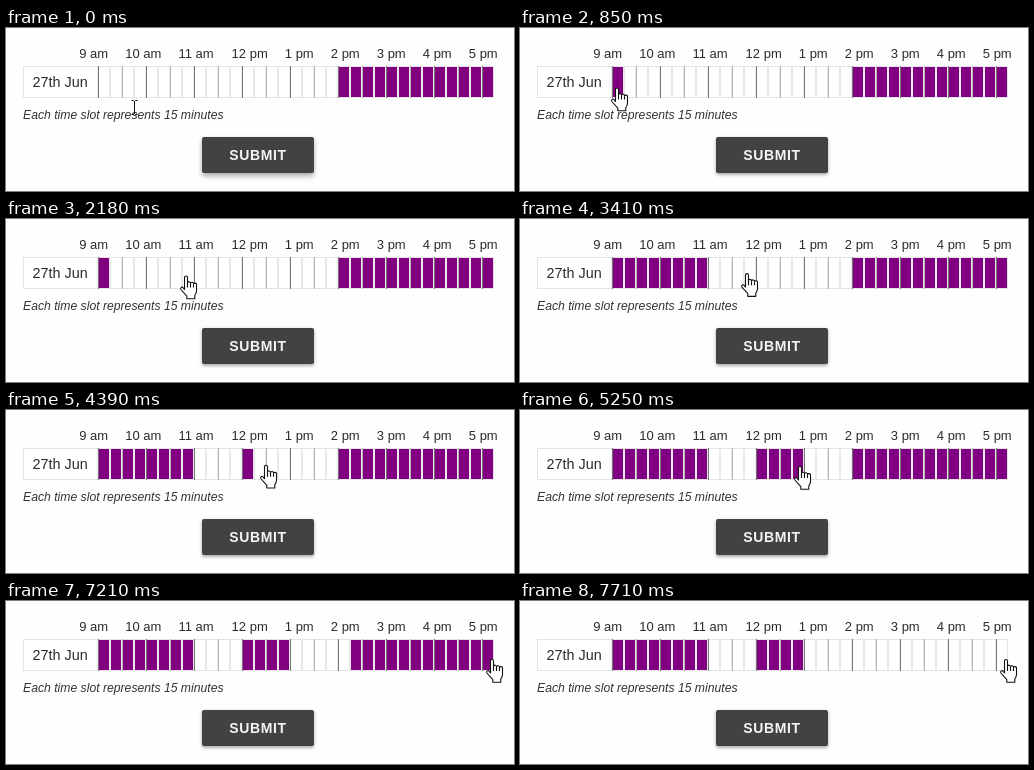
An HTML page for the animation above (8000 ms loop, 508x163 px).

```html
<!DOCTYPE html>
<html lang="en">
<head>
<meta charset="utf-8">
<title>Time slot picker</title>
<style>
  html, body { margin: 0; width: 100%; height: 100%; overflow: hidden; background: #fefefe; }
  svg { position: absolute; left: 0; top: 0; }
  text { font-family: "Liberation Sans", Arial, sans-serif; fill: #2b2b2b; }
  .hour { font-size: 13px; }
  .day { font-size: 14.4px; }
  .note { font-size: 12.2px; font-style: italic; fill: #333; }
  #submit {
    position: absolute; left: 196px; top: 109px; width: 112px; height: 36px;
    border-radius: 2px; background: #424242; color: #f4f4f4;
    font: bold 14px/36px "Liberation Sans", Arial, sans-serif; letter-spacing: .6px; text-align: center;
  }
</style>
</head>
<body>
<svg id="table" width="508" height="163">
  <rect x="17.5" y="38.5" width="470" height="31" fill="#fff" stroke="#e4e4e4"/>
  <text class="day" x="26.5" y="59">27th Jun</text>
  <text class="note" x="17" y="91">Each time slot represents 15 minutes</text>
</svg>
<div id="submit">SUBMIT</div>
<svg width="508" height="163">
  <path id="beam" d="M125.5 72.5h2l1 1l1-1h2M128.5 73v13M125.5 86.5h2l1-1l1 1h2" fill="none" stroke="#111"/>
  <g id="hand" stroke="#111" stroke-width="1.1" stroke-linejoin="round">
    <path fill="#fff" d="M4.5 14V2a1.5 1.5 0 0 1 3 0V7.5a1.5 1.5 0 0 1 3 .4a1.5 1.5 0 0 1 3 .8a1.5 1.5 0 0 1 3 .9V15.5Q16.5 17.5 14.8 20V23.2H6.8V20.6L.9 14C-.2 12 2.2 10.9 3.2 12.3Z"/>
    <path fill="none" d="M7.5 7.5V12M10.5 8V12M13.5 9V12"/>
  </g>
</svg>
<script>
const LOOP = 8000, STEP = 120, SLOTS = 33, SLOT = 12, LEFT = 93, AFTERNOON = 20;
const table = document.getElementById('table');
const hand = document.getElementById('hand');
const beam = document.getElementById('beam');
const submit = document.getElementById('submit');

function add(tag, attrs, text = '') {
  const el = document.createElementNS('http://www.w3.org/2000/svg', tag);
  for (const key in attrs) el.setAttribute(key, attrs[key]);
  el.textContent = text;
  return table.appendChild(el);
}
const bar = (x, width, fill, y = 39, height = 30) => add('rect', { x, y, width, height, fill });

// Hour labels flow inline: two-digit hours take one more digit width.
let labelX = 73.2;
for (let h = 9; h <= 17; h++) {
  const hour = h > 12 ? h - 12 : h;
  add('text', { class: 'hour', x: labelX, y: 30 }, `${hour} ${h < 12 ? 'am' : 'pm'}`);
  labelX += hour > 9 ? 53.2 : 46;
}

// Dark lines mark hours, grey lines half hours.
const cells = [];
for (let i = 0; i < SLOTS; i++) {
  const x = LEFT + i * SLOT;
  bar(x - 2, 2, '#e9e9e9');
  if (i % 2 === 0) bar(x - 1, 1, i % 4 ? '#b4b4b4' : '#777', 38, 32);
  cells.push(bar(x, 10, '#800080'));
}

// Each click or drag toggles a range of slots.
const toggles = [
  { at: 850, from: 0, to: 0 },
  { at: 2810, from: 1, to: 7 },
  { at: 4140, from: 12, to: 12 },
  { at: 5250, from: 13, to: 15 },
  { at: 6230, from: 20, to: 20 },
  { at: 7710, from: 21, to: 32 }
];

// The hand glides to each point in even steps, slowing down.
const glides = [
  { at: 120, steps: 4, x: 91, y: 59.5 },
  { at: 1220, steps: 7, x: 192, y: 56.5 },
  { at: 2060, steps: 2, x: 173.5, y: 56.5 },
  { at: 3170, steps: 5, x: 234, y: 53.5 },
  { at: 4390, steps: 3, x: 273.5, y: 56 },
  { at: 5500, steps: 4, x: 330, y: 56 },
  { at: 6600, steps: 5, x: 486, y: 58, power: 2.4 },
  { at: 7210, steps: 1, x: 480, y: 58 }
];

function handAt(t) {
  let x = 122, y = 70;
  for (const { at, steps, x: toX, y: toY, power = 1.7 } of glides) {
    if (t < at) break;
    const p = Math.min(1, (Math.floor((t - at) / STEP) + 1) / steps);
    const eased = 1 - (1 - p) ** power;
    x += (toX - x) * eased;
    y += (toY - y) * eased;
  }
  return `translate(${Math.round(x)} ${y})`;
}

function isSelected(i, t) {
  const hits = toggles.filter(g => t >= g.at && i >= g.from && i <= g.to).length;
  return (i >= AFTERNOON) !== (hits % 2 === 1);
}

const shadow = (drop, blur) =>
  `0 ${drop}px ${blur}px rgba(0,0,0,.22), 0 1px 4px rgba(0,0,0,.16)`;

function draw(t) {
  const moving = t >= glides[0].at;
  cells.forEach((cell, i) => cell.style.display = isSelected(i, t) ? '' : 'none');
  beam.style.display = moving ? 'none' : '';
  hand.style.display = moving ? '' : 'none';
  hand.setAttribute('transform', handAt(t));
  submit.style.boxShadow = t < 2 * STEP ? shadow(4, 5) : shadow(2, 3);
}

const start = performance.now();
function tick(now) {
  draw(Math.max(0, now - start) % LOOP);
  requestAnimationFrame(tick);
}
draw(0);
requestAnimationFrame(tick);
</script>
</body>
</html>
```
